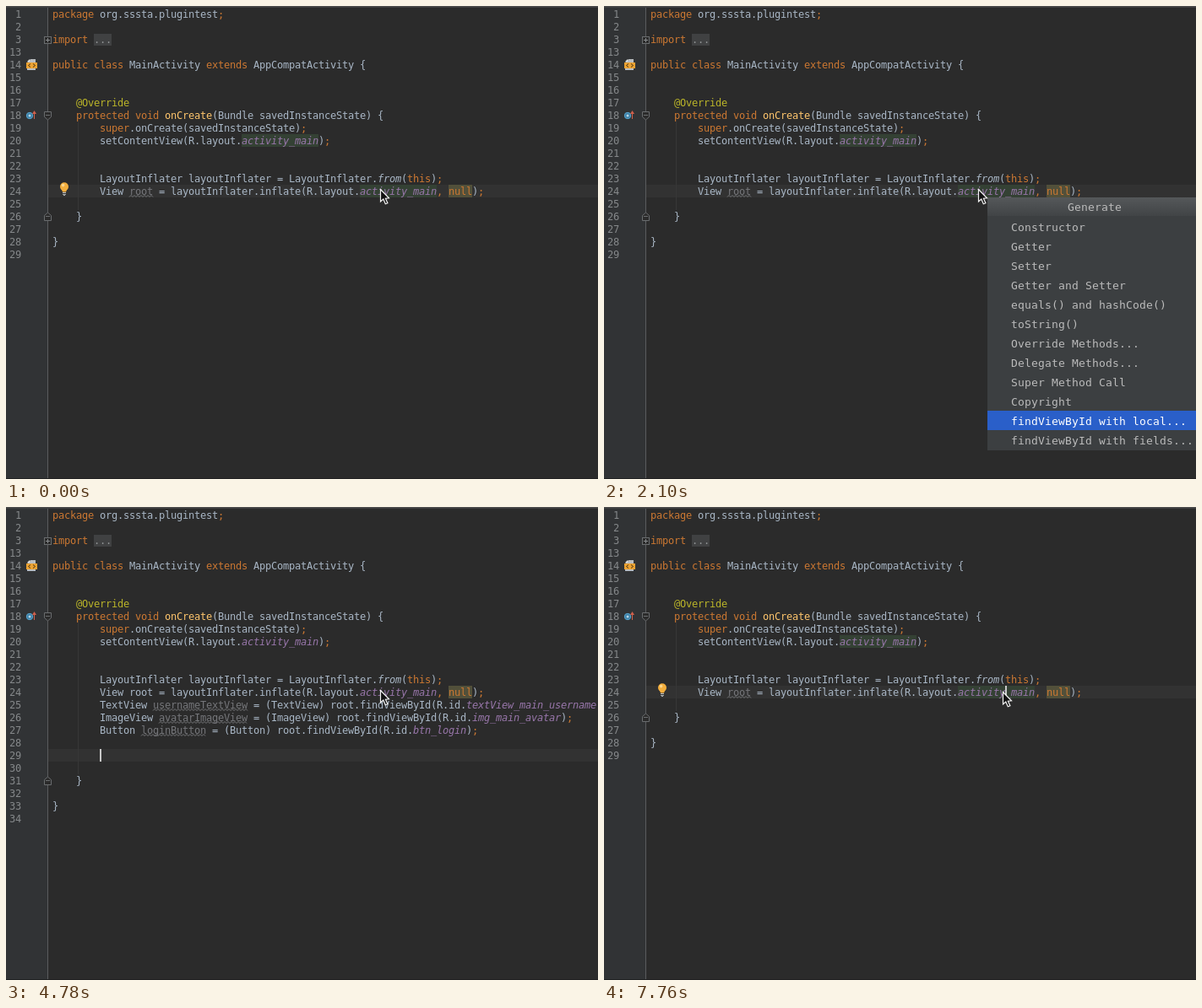
Recreate the animation shown at these times as an HTML page with a canvas. Size 701 px wide and 561 px high, loop 8 s.

```html
<!DOCTYPE html>
<html lang="en">
<head>
<meta charset="utf-8">
<title>Generating view lookups</title>
<style>
  html, body { margin: 0; height: 100%; overflow: hidden; background: #2b2b2b; }
  canvas { display: block; }
</style>
</head>
<body>
<canvas id="stage" width="701" height="561"></canvas>
<script>
const ctx = document.getElementById('stage').getContext('2d');
const LOOP = 8000, LEFT = 55, CELL = 7, ROW = 15;
const MONO = '"DejaVu Sans Mono", monospace';
const color = {
  text: '#a9b7c6', keyword: '#cc7832', annotation: '#bbb529', method: '#ffc66d',
  field: '#9876aa', unused: '#75767a', number: '#85888a', fold: '#6a6d6f',
  usage: '#344134', warning: '#52503a'
};
const keywords = new Set('package import public class extends protected void super this null'.split(' '));
const fields = new Set(['activity_main', 'textView_main_username', 'img_main_avatar', 'btn_login']);
const newNames = new Set(['usernameTextView', 'avatarImageView', 'loginButton']);

const head = `package org.sssta.plugintest;

import

public class MainActivity extends AppCompatActivity {


    @Override
    protected void onCreate(Bundle savedInstanceState) {
        super.onCreate(savedInstanceState);
        setContentView(R.layout.activity_main);


        LayoutInflater layoutInflater = LayoutInflater.from(this);
        View root = layoutInflater.inflate(R.layout.activity_main, null);`.split('\n');
const lookups = `        TextView usernameTextView = (TextView) root.findViewById(R.id.textView_main_username);
        ImageView avatarImageView = (ImageView) root.findViewById(R.id.img_main_avatar);
        Button loginButton = (Button) root.findViewById(R.id.btn_login);`.split('\n');
const tail = ['', '    }', '', '}', ''];

const menuItems = ['Constructor', 'Getter', 'Setter', 'Getter and Setter', 'equals() and hashCode()',
  'toString()', 'Override Methods...', 'Delegate Methods...', 'Super Method Call', 'Copyright',
  'findViewById with local...', 'findViewById with fields...'];

// Each track is a list of [start time, ...values]; a value holds until the next start.
const caretTrack = [[0, 14, 57, 0], [300, 14, 57, 1], [900, 14, 57, 0], [2840, 18, 8, 1],
  [2990, 19, 8, 1], [4330, 19, 8, 0], [4780, 19, 8, 1], [5080, 18, 8, 1], [5670, 14, 73, 1],
  [6710, 14, 60, 1], [7010, 14, 60, 0], [7310, 14, 60, 1]];
const pointerTrack = [[0, 443.5, 217], [6410, 498.5, 218], [6560, 499.5, 219], [6710, 472.5, 219]];
const blankTrack = [[0, 0], [2840, 1], [2990, 2], [5080, 1], [5670, 0]];
const menuTrack = [[0, -1], [1350, 0], [1950, 11], [2100, 10], [2700, -1]];

const valuesAt = (track, t) => track.findLast(step => step[0] <= t).slice(1);
const within = (t, from, to) => t >= from && t < to;
const rowTop = row => 2 + ROW * row;

function rect(x, y, w, h, fill) {
  ctx.fillStyle = fill;
  ctx.fillRect(x, y, w, h);
}

function shape(points, fill, stroke, width = 1) {
  ctx.beginPath();
  points.forEach(([x, y]) => ctx.lineTo(x, y));
  ctx.closePath();
  paint(fill, stroke, width);
}

function disc(x, y, r, fill, stroke) {
  ctx.beginPath();
  ctx.arc(x, y, r, 0, 2 * Math.PI);
  paint(fill, stroke, 1);
}

function paint(fill, stroke, width) {
  if (fill) { ctx.fillStyle = fill; ctx.fill(); }
  if (stroke) { ctx.strokeStyle = stroke; ctx.lineWidth = width; ctx.stroke(); }
}

// Monospaced text on a whole-pixel grid.
function write(text, x, y, fill, { size = 12, cell = CELL, italic = false } = {}) {
  ctx.font = `${italic ? 'italic ' : ''}${size}px ${MONO}`;
  ctx.fillStyle = fill;
  [...text].forEach((c, i) => c !== ' ' && ctx.fillText(c, x + i * cell, y));
}

function wave(x, y, width) {
  ctx.beginPath();
  for (let i = 0; i <= width; i += 2) ctx.lineTo(x + i, y + (i % 4 ? 0 : 2));
  paint(null, '#76777a', 1);
}

function tokenStyle(word, before, after, t) {
  if (keywords.has(word) || word === ';' || word === ',') return { fill: color.keyword };
  if (word[0] === '@') return { fill: color.annotation };
  if (word === 'onCreate' && before.endsWith('void ')) return { fill: color.method };
  if (word === 'from') return { fill: color.text, italic: true };
  if (fields.has(word)) {
    const resolved = word === 'activity_main' || t >= (word === 'btn_login' ? 3430 : 3280);
    if (resolved) return { fill: color.field, italic: true };
  }
  const unused = word === 'root' ? !within(t, 3430, 6120) : newNames.has(word) && t >= 3430;
  if (unused && after.startsWith(' =')) return { fill: color.unused, wavy: true };
  return { fill: color.text };
}

function codeLine(line, row, t) {
  const top = rowTop(row);
  for (const { 0: word, index } of line.matchAll(/@?\w+|[^\w\s]/g)) {
    const x = LEFT + index * CELL, width = word.length * CELL;
    const style = tokenStyle(word, line.slice(0, index), line.slice(index + word.length), t);
    if (word === 'null') rect(x, top, width, ROW, color.warning);
    if (word === 'activity_main' && !within(t, 3280, 7310)) rect(x, top, width, ROW, color.usage);
    write(word, x, top + 12, style.fill, style);
    if (style.wavy) wave(x, top + 12.5, width);
  }
}

function foldMark(row, up) {
  const y = rowTop(row) + 8, d = up ? -1 : 1;
  shape([[45.5, y - 4.5 * d], [53.5, y - 4.5 * d], [53.5, y + 1.5 * d], [49.5, y + 5 * d],
    [45.5, y + 1.5 * d]], '#2b2b2b', color.fold);
  rect(47, y - 1, 5, 1, color.fold);
}

function gutterIcons(closeRow) {
  rect(45, 36, 9, 9, color.fold);
  rect(46, 37, 7, 7, '#2b2b2b');
  rect(47, 40, 5, 1, '#888b8d');
  rect(49, 38, 1, 5, '#888b8d');
  foldMark(8, false);
  foldMark(closeRow, true);

  shape([[29, 63], [35, 63], [35, 76], [25, 76], [25, 67]], '#b9bdc0');
  shape([[25, 66], [28, 63], [28, 66]], '#e4e6e7');
  rect(24, 67, 13, 7, '#eba233');
  ctx.beginPath();
  ctx.moveTo(29, 68.5); ctx.lineTo(26.5, 70.5); ctx.lineTo(29, 72.5);
  ctx.moveTo(32, 68.5); ctx.lineTo(34.5, 70.5); ctx.lineTo(32, 72.5);
  paint(null, '#4a3512', 1);

  disc(28, 130, 3.7, '#3c7fa6', '#58a5cf');
  disc(28, 130, 1.5, '#b9d6e5');
  rect(33, 126, 1, 8, '#d0604c');
  shape([[33.5, 124], [36, 128], [31, 128]], '#d0604c');
}

function bulb() {
  disc(69, 214.3, 5, '#f3ae3d');
  shape([[65.5, 217], [72.5, 217], [71, 220.5], [67, 220.5]], '#f3ae3d');
  disc(67.6, 212.6, 1.8, '#fbd58c');
  rect(67, 221, 4, 1, '#c3c6c8');
  rect(67, 223, 4, 1, '#a4a8aa');
  rect(68, 224, 2, 1, '#a4a8aa');
}

function menu(selected) {
  const x = 454, top = 227, width = 247, itemHeight = 23, font = { size: 13, cell: 8 };
  rect(x, top, width, 300, '#3c3f41');
  const bar = ctx.createLinearGradient(0, top, 0, top + 22);
  bar.addColorStop(0, '#55585a');
  bar.addColorStop(1, '#414446');
  rect(x, top, width, 22, bar);
  write('Generate', 549, 243, '#bbbbbb', font);
  menuItems.forEach((item, i) => {
    const y = 250 + i * itemHeight;
    if (i === selected) rect(x, y, width, itemHeight, '#2a5fc9');
    write(item, 482, y + 17, i === selected ? '#ffffff' : '#bbbbbb', font);
  });
}

function pointer(x, y) {
  const outline = [[0, 0], [0, 14.5], [3.3, 11.6], [5.8, 17.3], [8.4, 16.2], [5.9, 10.7], [10, 10.3]];
  shape(outline.map(([dx, dy]) => [x + dx, y + dy + 0.5]), '#111111', '#f4f4f4', 1.2);
}

function draw(t) {
  const [blanks] = valuesAt(blankTrack, t);
  const [caretRow, caretCol, caretOn] = valuesAt(caretTrack, t);
  const [selected] = valuesAt(menuTrack, t);
  const inserted = blanks ? [...lookups, ...Array(blanks).fill('')] : [];
  const lines = [...head, ...inserted, ...tail];
  const closeRow = lines.length - 4;

  rect(0, 0, 701, 561, '#2b2b2b');
  rect(0, 0, 49, 561, '#313335');
  rect(50, rowTop(caretRow), 651, ROW, '#323232');
  rect(49, 0, 1, 560, '#5a5c5e');
  rect(0, 0, 701, 1, '#4b4b4b');
  rect(0, 1, 701, 1, '#3f4041');
  rect(0, 560, 701, 1, '#202122');
  rect(85, rowTop(9), 1, (closeRow - 9) * ROW, '#373737');

  lines.forEach((line, row) => {
    const number = String(row < 3 ? row + 1 : row + 10);
    write(number, 18 - number.length * CELL, rowTop(row) + 12, color.number);
    codeLine(line, row, t);
  });
  rect(104, 33, 21, 14, '#404142');
  write('...', 104, 44, '#8f9293');
  gutterIcons(closeRow);

  if (!within(t, 1350, 7760)) bulb();
  if (caretOn) rect(LEFT + caretCol * CELL, rowTop(caretRow), 2, ROW, '#c8c8c8');
  if (selected >= 0) menu(selected);
  pointer(...valuesAt(pointerTrack, t));
}

function tick() {
  draw(performance.now() % LOOP);
  requestAnimationFrame(tick);
}
tick();
</script>
</body>
</html>
```
